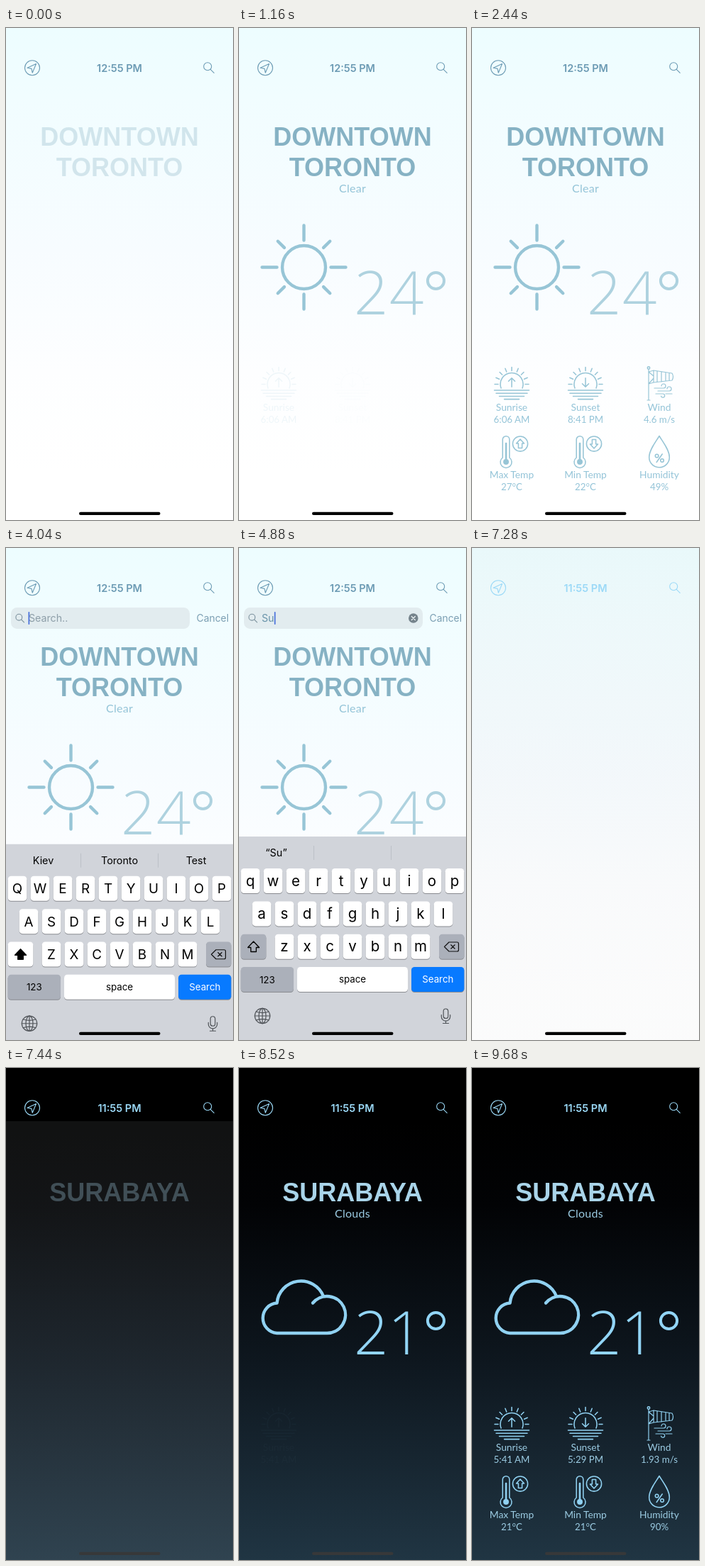
These frames come from a looping animation (320x694 px, 9720 ms). An HTML page:

```html
<!DOCTYPE html>
<html lang="en">
<head>
<meta charset="utf-8">
<title>Weather</title>
<style>
html, body { margin: 0; width: 100%; height: 100%; overflow: hidden; background: #fff; }
svg { display: block; width: 100%; height: 100%; }
.day { --head: #6c9bb4; --title: #86b2c4; --text: #94c4d8; --icon: #97c5d6; --temp: #aed2df; }
.night { --head: #9bd9f7; --title: #a9d4e9; --text: #9bcbe2; --icon: #90d1f1; --temp: #92d5f6; }
.line { fill: none; stroke: var(--icon); stroke-linecap: round; stroke-linejoin: round; }
.title { font: bold 36px "Liberation Sans", Arial, sans-serif; fill: var(--title); }
.sky { font: 16px Lato, sans-serif; letter-spacing: .3px; fill: var(--text); }
.temp { font: 300 85px "Open Sans", sans-serif; fill: var(--temp); }
.label { font: 13.8px Lato, sans-serif; fill: var(--text); }
.value { font: 13.3px Lato, sans-serif; fill: var(--text); }
.ui { font-family: Inter, sans-serif; }
.mid { text-anchor: middle; }
</style>
</head>
<body>
<svg id="stage" viewBox="0 0 320 694" preserveAspectRatio="none"></svg>
<script>
const LOOP = 9720;
const NIGHT_AT = 7440;
const WORD = "Surabaya";
const stage = document.getElementById("stage");

const clamp = x => Math.max(0, Math.min(1, x));
const ramp = (t, a, b) => { const p = clamp((t - a) / (b - a)); return p * p * (3 - 2 * p); };
const easeOut = p => 1 - (1 - p) ** 3;

const text = (x, y, s, cls, extra = "") => `<text x="${x}" y="${y}" class="${cls}" ${extra}>${s}</text>`;
const rect = (x, y, w, h, r, fill, extra = "") =>
  `<rect x="${x}" y="${y}" width="${w}" height="${h}" rx="${r}" fill="${fill}" ${extra}/>`;
const circle = (x, y, r, extra = "") => `<circle cx="${x}" cy="${y}" r="${r}" ${extra}/>`;
const path = (d, extra = "") => `<path d="${d}" ${extra}/>`;
const at = (x, y, body) => `<g transform="translate(${x} ${y})">${body}</g>`;

// A straight ray pointing away from the origin.
function ray(deg, a, b) {
  const c = Math.cos(deg * Math.PI / 180), s = Math.sin(deg * Math.PI / 180);
  return `M${c * a} ${s * a}L${c * b} ${s * b}`;
}

function bigSun() {
  let d = "";
  for (let i = 0; i < 8; i++) d += i % 2 ? ray(i * 45, 39, 52) : ray(i * 45, 38, 59);
  return at(91.5, 337.5, circle(0, 0, 30.5) + path(d));
}

const bigCloud = () =>
  path("M53.5 331.5A21.3 21.3 0 0 0 53.5 374H124A26 26 0 1 0 104 331.5M53.5 331.5A34 34 0 0 1 119 322");

const arrow = (up, len, w) => {
  const s = up ? -1 : 1;
  return `M0 ${-s * len}V${s * len}M${-w} ${s * (len - w)}L0 ${s * len}L${w} ${s * (len - w)}`;
};

// Small icons are centred on x = 0 with their top near y = 0.
function horizon(up) {
  let d = "M-15 30A16 16 0 1 1 15 30";
  [24.5, 22, 17.5, 10.5].forEach((w, i) => d += `M${-w} ${33 + i * 4.2}H${w}`);
  let rays = "";
  for (let i = 0; i < 9; i++) rays += ray(180 + i * 22.5, 19, 24);
  return path(d) + at(0, 24.5, path(rays)) + at(0, 22, path(arrow(up, 6.2, 4.5)));
}

const windsock = () =>
  circle(-15, 1.5, 1.7) +
  path("M-15 3.5V47M-17 47H-13M-15 7L-8 5V22L-15 24M-15 7L-8 13M-15 24L-8 16" +
    "M-8 5L18 9Q21 14 18 19L-8 22M-3 6V21.5M3 7V21M9 8V20M14 8.5V19.5", 'stroke-width="1.2"') +
  path("M-7 30H6A3 3 0 1 0 3 27M-2 34H14A3 3 0 1 0 11 31M-5 38H5A2.6 2.6 0 1 1 2.5 41M9 38H18",
    'stroke-width="1.2"');

const thermometer = up =>
  path("M-12.8 31V5.5A4.8 4.8 0 0 1 -3.2 5.5V31A8 8 0 1 1 -12.8 31Z") +
  path("M-8 11V36", 'stroke-width="2.6"') +
  circle(-8, 37, 3.2, 'fill="var(--icon)"') +
  circle(12, 11.5, 10.6) +
  at(12, 11.5, `<g transform="scale(1 ${up ? 1 : -1})">` +
    path("M0 -6.5L5.5 -.5H2.6V6H-2.6V-.5H-5.5Z") + "</g>");

const drop = () =>
  path("M0 .5C5 9 14.3 20 14.3 30.5A14.3 14.3 0 0 1 -14.3 30.5C-14.3 20 -5 9 0 .5Z") +
  circle(-3.4, 28.5, 2.3) + circle(4, 35, 2.3) + path("M4.2 26L-3.8 37.5");

const ICONS = [horizon(true), horizon(false), windsock(), thermometer(true), thermometer(false), drop()];
const LABELS = ["Sunrise", "Sunset", "Wind", "Max Temp", "Min Temp", "Humidity"];

function scene(id, { title, base, sky, icon, temp, oneX, values }) {
  const part = body => `<g class="part">${body}</g>`;
  const end = base + 43 * (title.length - 1);
  const stats = LABELS.map((label, i) => {
    const x = 56 + 104 * (i % 3), low = i > 2;
    return part(
      `<g class="line" stroke-width="1.55">${at(x, low ? 575 : 478, ICONS[i])}</g>` +
      text(x, low ? 635 : 540, label, "label mid") +
      text(x, low ? 652 : 556.5, values[i], "value mid"));
  });
  return `<g id="${id}" class="${id}">` +
    part(title.map((s, i) => text(160, base + 43 * i, s, "title mid")).join("")) +
    part(text(160, end + 22.5, sky, "sky mid")) +
    part(`<g class="line" stroke-width="4.4">${icon}</g>`) +
    part(text(162, 403.5, temp[0], "temp") + text(oneX, 403.5, temp[1], "temp") +
      circle(277.5, 356.5, 11.6, 'fill="none" stroke="var(--temp)" stroke-width="4"')) +
    stats.join("") + "</g>";
}

const cap = (x, y, w, fill) =>
  rect(x, y + 1, w, 35, 4.5, "#898b90") + rect(x, y, w, 35, 4.5, fill);

function keyboard() {
  let s = rect(0, 407, 320, 310, 0, "#d1d4da");
  s += path("M105.5 420V440M214.5 420V440", 'stroke="#bcc0c7"');
  [52.5, 160, 268].forEach(x => s += text(x, 435, "", "ui mid hint", 'font-size="14.3"'));
  [["QWERTYUIOP", 16], ["ASDFGHJKL", 32], ["ZXCVBNM", 64]].forEach(([row, x0], r) => {
    [...row].forEach((ch, i) => {
      const x = x0 + 32 * i, y = 452 + 46.4 * r;
      s += cap(x - 13.3, y, 26.6, "#fff") + text(x, y + 24.5, ch, "ui mid letter");
    });
  });
  s += `<g id="shift">${cap(2.7, 544.8, 35.6, "#fff")}` +
    path("M20.5 555L28.5 563.5H24.3V569.5H16.7V563.5H12.5Z", 'stroke="#000" stroke-width="1.3" stroke-linejoin="round"') + "</g>";
  s += cap(282, 544.8, 35.4, "#abb0ba") +
    path("M296 556H307.5Q309.5 556 309.5 558V567Q309.5 569 307.5 569H296L289.5 562.5ZM298.5 559.5L304.5 565.5M304.5 559.5L298.5 565.5",
      'fill="none" stroke="#111" stroke-width="1.2" stroke-linejoin="round"');
  s += cap(2.7, 591, 74.3, "#abb0ba") + text(39.8, 613.5, "123", "ui mid", 'font-size="13.3"');
  s += cap(82, 591, 156, "#fff") + text(160, 613, "space", "ui mid", 'font-size="13.3"');
  s += cap(243, 591, 74.4, "#087aff") + text(280.3, 613, "Search", "ui mid", 'font-size="13.3" fill="#fff"');
  s += `<g fill="none" stroke="#505459" stroke-width="1.2" stroke-linecap="round">` +
    at(33, 660, circle(0, 0, 10.7) + '<ellipse rx="5" ry="10.7"/>' +
      path("M0 -10.7V10.7M-10.7 0H10.7M-8.8 -6Q0 -2.8 8.8 -6M-8.8 6Q0 2.8 8.8 6")) +
    at(291.5, 660, rect(-3.3, -10, 6.6, 13.5, 3.3, "none") +
      path("M-6.2 -1.5V1A6.2 6.2 0 0 0 6.2 1V-1.5M0 7.2V10.5M-4 10.5H4")) + "</g>";
  return s;
}

const lens = (x, y, k) => `<g transform="translate(${x} ${y}) scale(${k})">` +
  circle(0, 0, 5.5) + path("M4 4L9 9") + "</g>";

stage.innerHTML = `
<defs>
  <linearGradient id="dayBg" x2="0" y2="1">
    <stop stop-color="#edfdff"/><stop offset=".14" stop-color="#f1fdff"/>
    <stop offset=".45" stop-color="#f7fcff"/><stop offset=".7" stop-color="#fdfeff"/>
    <stop offset=".9" stop-color="#fff"/>
  </linearGradient>
  <linearGradient id="nightBg" x2="0" y2="1">
    <stop offset=".11" stop-color="#000"/><stop offset=".28" stop-color="#020305"/>
    <stop offset=".6" stop-color="#0e171f"/><stop offset="1" stop-color="#203543"/>
  </linearGradient>
</defs>` +
  rect(0, 0, 320, 694, 0, "url(#dayBg)") +
  rect(0, 0, 320, 694, 0, "url(#nightBg)", 'id="dark"') +
  rect(0, 0, 320, 75, 0, "#000", 'id="darkHead"') +
  scene("day", {
    title: ["DOWNTOWN", "TORONTO"], base: 166, sky: "Clear", icon: bigSun(), temp: "24", oneX: 212,
    values: ["6:06 AM", "8:41 PM", "4.6 m/s", "27°C", "22°C", "49%"]
  }) +
  scene("night", {
    title: ["SURABAYA"], base: 188, sky: "Clouds", icon: bigCloud(), temp: "21", oneX: 210,
    values: ["5:41 AM", "5:29 PM", "1.93 m/s", "21°C", "21°C", "90%"]
  }) +
  `<g id="head">` +
  text(160, 62, "", "ui mid", 'id="clock" font-size="14.5" font-weight="600" fill="var(--head)"') +
  `<g fill="none" stroke="var(--head)" stroke-width="1.1" stroke-linejoin="round" stroke-linecap="round">` +
  circle(37, 56.2, 10.5) + path("M42.5 50.5L30 56.3L36 57.4L37.2 63.2Z") + lens(284.2, 54.3, 1) + "</g></g>" +
  `<g id="bar">` + rect(7, 84, 252, 30, 8.5, "#e2ecef") +
  `<g fill="none" stroke="#7c929e" stroke-width="1.4" stroke-linecap="round">${lens(18.3, 97.7, .8)}</g>` +
  text(32, 104, "", "ui", 'id="query" font-size="14.2"') +
  rect(0, 90, 1.7, 18, .8, "#466fdc", 'id="caret"') +
  `<g id="clear">${circle(245.8, 99, 6.8, 'fill="#75838b"')}${path("M243.3 96.5L248.3 101.5M248.3 96.5L243.3 101.5",
    'stroke="#eef4f6" stroke-width="1.3" stroke-linecap="round"')}</g>` +
  text(268.5, 104, "Cancel", "ui", 'font-size="13.9" fill="#7b9fb3"') + "</g>" +
  `<g id="keys">${keyboard()}</g>` +
  rect(103, 682.8, 114.5, 4.2, 2.1, "#000", 'id="home"');

const $ = id => document.getElementById(id);
const show = (el, o) => {
  el.style.opacity = o;
  el.style.display = o > 0 ? "" : "none";
};
const parts = { day: [...$("day").children], night: [...$("night").children] };
const letters = [...document.querySelectorAll(".letter")];
const hints = [...document.querySelectorAll(".hint")];
const [shiftCap, shiftArrow] = [$("shift").children[1], $("shift").children[2]];
let shownLength = -1;

function reveal(id, u) {
  parts[id].forEach((el, i) => {
    const start = i ? (i < 4 ? 100 + 130 * i : 1020 + 90 * (i - 4)) : -220;
    show(el, ramp(u, start, start + 600));
  });
}

function setQuery(n) {
  if (n === shownLength) return;
  shownLength = n;
  const typed = WORD.slice(0, n), upper = n === 0;
  $("query").textContent = typed || "Search..";
  $("query").setAttribute("fill", upper ? "#8d9ea8" : "#6994aa");
  $("caret").setAttribute("x", upper ? 31.5 : 32.3 + $("query").getComputedTextLength());
  show($("clear"), upper ? 0 : 1);
  const words = upper ? ["Kiev", "Toronto", "Test"] : [`“${typed}”`, "", ""];
  hints.forEach((el, i) => el.textContent = words[i]);
  letters.forEach(el => {
    el.textContent = upper ? el.textContent.toUpperCase() : el.textContent.toLowerCase();
    el.setAttribute("font-size", upper ? 18.8 : 20.5);
  });
  shiftCap.setAttribute("fill", upper ? "#fff" : "#abb0ba");
  shiftArrow.setAttribute("fill", upper ? "#000" : "none");
}

function draw(t) {
  const dark = t >= 7320;
  show($("dark"), ramp(t, 7264, 7475));
  show($("darkHead"), dark ? 1 : 0);
  $("home").setAttribute("fill", dark ? "#373839" : "#000");

  const late = t >= 7240;
  $("clock").textContent = late ? "11:55 PM" : "12:55 PM";
  $("head").setAttribute("class", late ? "night" : "day");

  show($("day"), 1 - ramp(t, 6900, 7200));
  show($("night"), dark ? 1 : 0);
  reveal("day", t);
  reveal("night", t - NIGHT_AT);

  const open = t > 3640 && t < 6760;
  show($("bar"), open ? ramp(t, 3640, 3900) * (1 - ramp(t, 6460, 6740)) : 0);
  const up = easeOut(clamp((t - 3708) / 500)) - ramp(t, 6460, 6840);
  show($("keys"), up > 0 ? 1 : 0);
  $("keys").setAttribute("transform", `translate(0 ${288 * (1 - up)})`);

  if (open) {
    setQuery(Math.max(0, Math.min(WORD.length, Math.floor((t - 4680) / 200) + 1)));
    show($("caret"), t > 3800 && t < 6460 ? 1 : 0);
  }
}

const begin = performance.now();
function tick() {
  draw((performance.now() - begin) % LOOP);
  requestAnimationFrame(tick);
}
draw(0);
requestAnimationFrame(tick);
</script>
</body>
</html>
```
